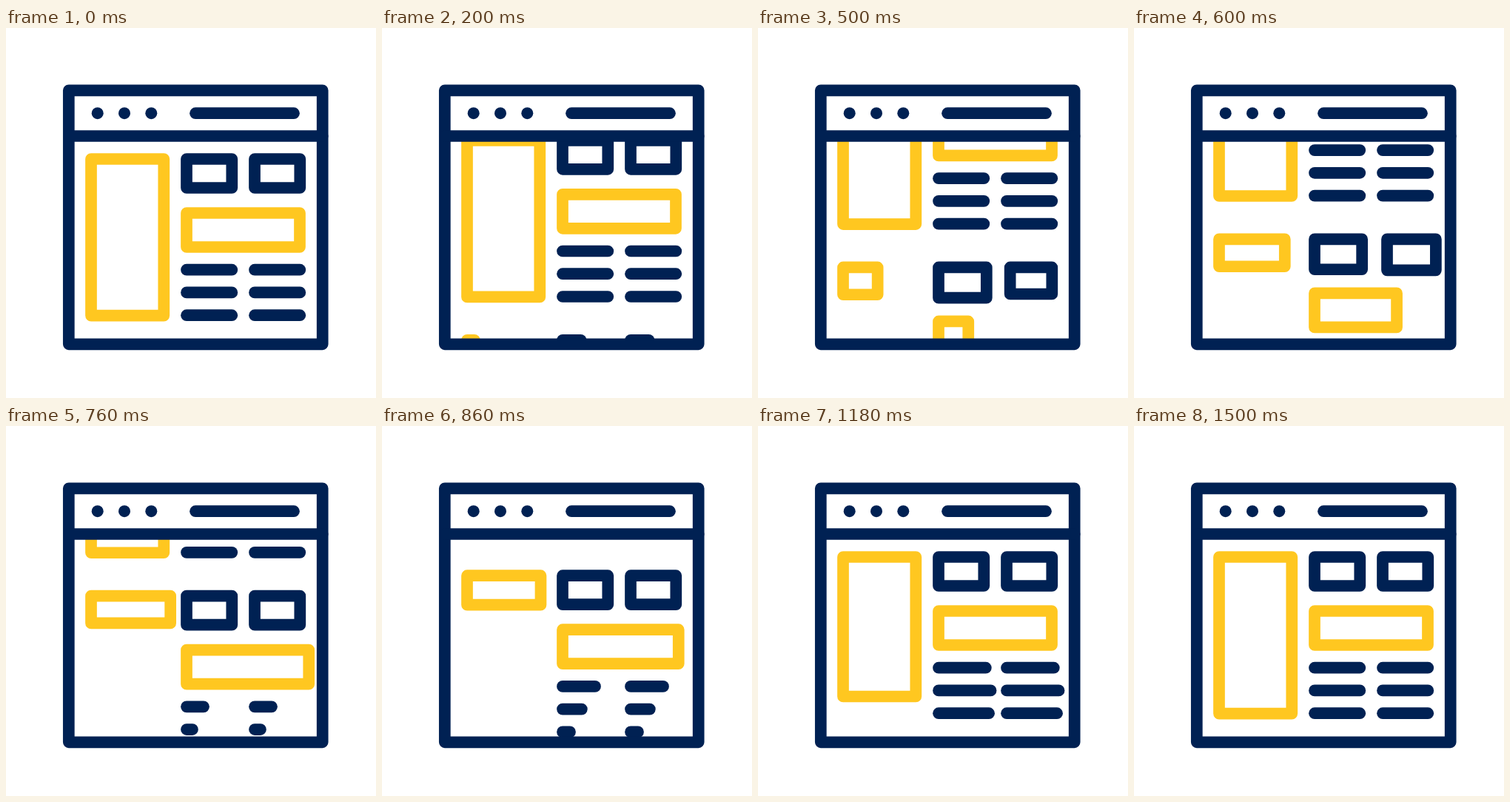
Animation, 500 px wide and 500 px high, one loop 1.68 s. Source, as an HTML page with a canvas:

```html
<!DOCTYPE html>
<html lang="en">
<head>
<meta charset="utf-8">
<title>Page scroll</title>
<style>
  html, body { margin: 0; width: 100%; height: 100%; overflow: hidden; background: #fff; }
  canvas { display: block; width: 500px; height: 500px; }
</style>
</head>
<body>
<canvas width="500" height="500"></canvas>
<script>
const ctx = document.querySelector('canvas').getContext('2d');
const NAVY = '#002153', YELLOW = '#ffc720';
const LOOP = 1680, STEP = 20, SCROLL_TIME = 1060, PAGE = 270;
const COLUMNS = [244, 336], ROWS = [326.7, 357.4, 388.2];

const mix = (a, b, k) => a + (b - a) * k;

// Eased progress 0..1 from a start time over a duration
function ease(t, start, duration) {
  const u = Math.min(1, Math.max(0, (t - start) / duration));
  return u * u * (3 - 2 * u);
}

// Grow from one value to a peak, then settle at 1
function pop(t, start, rise, settle, from, peak) {
  const grown = mix(from, peak, ease(t, start, rise));
  return mix(grown, 1, ease(t, start + rise, settle));
}

function box(color, x, y, w, h) {
  ctx.strokeStyle = color;
  ctx.strokeRect(x, y, w, h);
}

function line(x, y, length) {
  ctx.strokeStyle = NAVY;
  ctx.beginPath();
  ctx.moveTo(x, y);
  ctx.lineTo(x + Math.max(length, 0.01), y);
  ctx.stroke();
}

function drawPage(y, t) {
  const tallW = pop(t, 360, 340, 200, 0.1, 1.115);
  const tallH = pop(t, 825, 510, 165, 0.174, 1.094);
  const wide = pop(t, 391, 340, 200, 0, 1.085);
  box(YELLOW, 115, y + 177, 98.3 * tallW, 211.6 * tallH);
  box(YELLOW, 244, y + 250, 153 * wide, 46);

  COLUMNS.forEach((x, i) => {
    const start = 193 + 71 * i;
    const size = pop(t, start, 340, 160, 0.4, 1.075);
    const shift = 6 * i * (ease(t, start, 340) - ease(t, start + 340, 160));
    box(NAVY, x + shift, y + 177, 61.3 * size, 39 * size);
    ROWS.forEach((row, j) =>
      line(x, y + row, 61.3 * pop(t, 570 + 86 * j, 500, 165, 0, 1.16)));
  });
}

function drawWindow() {
  box(NAVY, 84.8, 84.3, 342.9, 343);
  line(84.8, 146, 342.9);
  line(256, 115.2, 133);
  ctx.fillStyle = NAVY;
  for (const x of [123.7, 160, 196.3]) {
    ctx.beginPath();
    ctx.arc(x, 115.2, 8, 0, 2 * Math.PI);
    ctx.fill();
  }
}

function render(now) {
  const t = Math.floor((now % LOOP) / STEP) * STEP;
  const scroll = PAGE * ease(t, 0, SCROLL_TIME);
  ctx.clearRect(0, 0, 500, 500);
  ctx.lineWidth = 15.7;
  ctx.lineJoin = ctx.lineCap = 'round';

  ctx.save();
  ctx.beginPath();
  ctx.rect(92, 146, 328, 278);
  ctx.clip();
  drawPage(-scroll, Infinity);
  drawPage(PAGE - scroll, t);
  ctx.restore();

  drawWindow();
}

function tick() {
  render(performance.now());
  requestAnimationFrame(tick);
}
tick();
</script>
</body>
</html>
```
